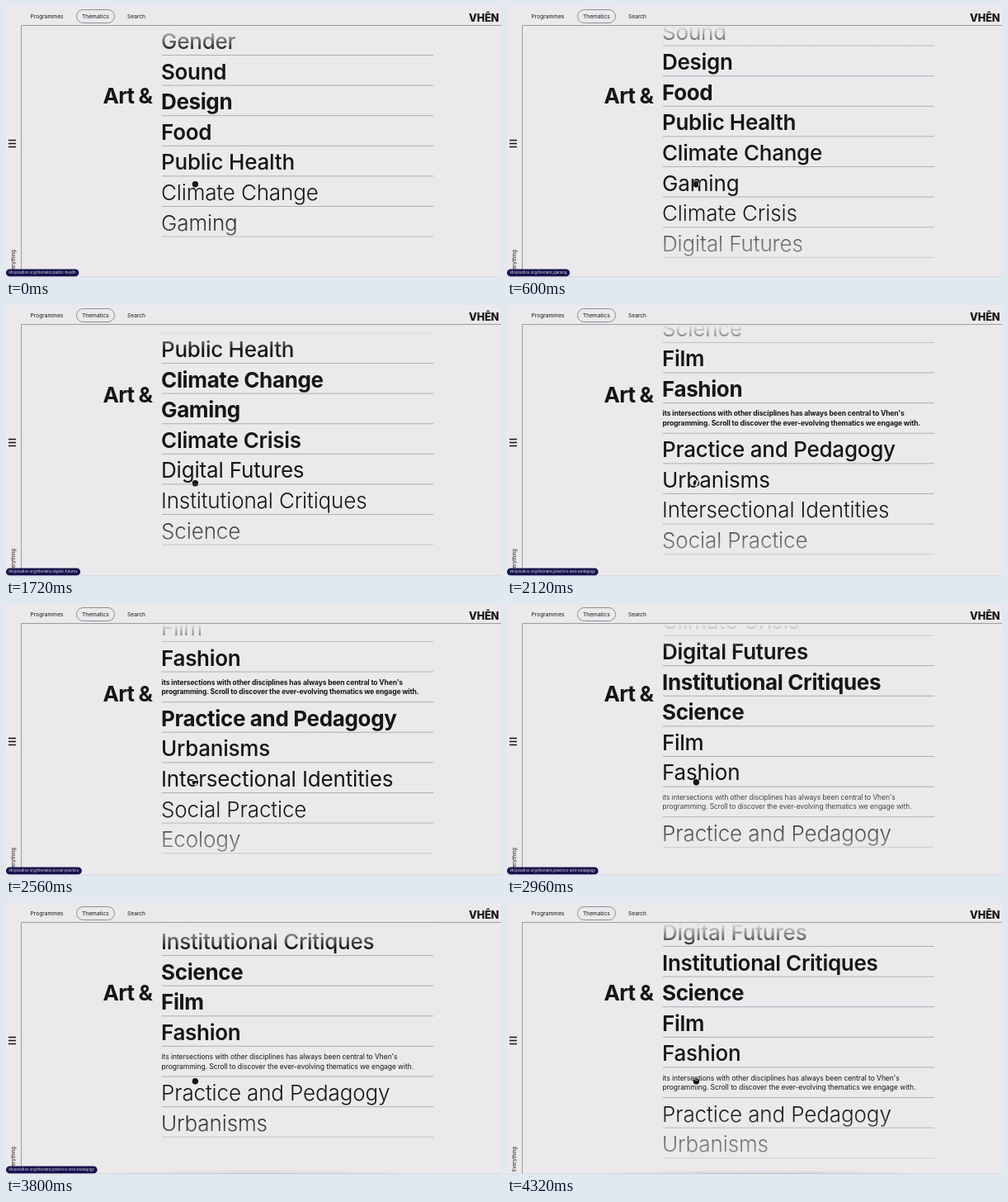
Recreate the animation shown at these times as an HTML page. Size 600x328 px, loop 4400 ms.

```html
<!DOCTYPE html>
<html lang="en">
<head>
<meta charset="utf-8">
<title>Thematics</title>
<style>
  html, body { margin: 0; width: 100%; height: 100%; overflow: hidden; background: #ebe9ec; }
  svg { display: block; width: 600px; height: 328px; font-family: Inter, "Open Sans", sans-serif; fill: #161517; }
  .nav { font-size: 6.65px; }
  .rule { stroke: #949296; stroke-width: 0.9; }
  .row line { stroke: #a9a7ab; stroke-width: 0.9; }
  .row text { letter-spacing: var(--gap); }
  .title { font-size: 26px; }
  .note { font-size: 8.5px; }
  .lead { font-size: 26px; font-weight: 700; letter-spacing: -0.032em; }
  .mark { font-size: 12.8px; font-weight: 800; letter-spacing: -0.01em; }
  .status { font-size: 4.45px; fill: #dddbea; }
  .dot { fill: #fff; mix-blend-mode: difference; }
</style>
</head>
<body>
<svg viewBox="0 0 600 328">
  <defs>
    <linearGradient id="fade" gradientUnits="userSpaceOnUse" x1="0" y1="24" x2="0" y2="328">
      <stop offset="0" stop-color="#fff" stop-opacity="0"/>
      <stop offset="0.1" stop-color="#fff"/>
      <stop offset="0.75" stop-color="#fff"/>
      <stop offset="0.82" stop-color="#fff" stop-opacity="0.76"/>
      <stop offset="0.88" stop-color="#fff" stop-opacity="0.53"/>
      <stop offset="1" stop-color="#fff" stop-opacity="0.36"/>
    </linearGradient>
    <mask id="window" maskUnits="userSpaceOnUse" x="0" y="24" width="600" height="304">
      <rect y="24" width="600" height="304" fill="url(#fade)" style="mask-type:alpha"/>
    </mask>
    <radialGradient id="shade">
      <stop offset="0" stop-color="#000" stop-opacity="0.15"/>
      <stop offset="1" stop-color="#000" stop-opacity="0"/>
    </radialGradient>
  </defs>

  <rect width="600" height="328" fill="#ebe9ec"/>
  <path class="rule" d="M18.5 328V23.5H600" fill="none"/>
  <path d="M0 327.5H600" stroke="#dbd9dd"/>

  <g class="nav">
    <text x="29.6" y="14.7">Programmes</text>
    <text x="92" y="14.7">Thematics</text>
    <text x="147" y="14.7">Search</text>
    <rect x="85.5" y="4.5" width="46" height="16" rx="8" fill="none" stroke="#77757a" stroke-width="0.8"/>
  </g>
  <text class="mark" x="597.5" y="18.5" text-anchor="end">VHĒN</text>
  <path d="M3 162.5h9M3 166.5h9M3 170.5h9" stroke="#161517" stroke-width="1.4"/>
  <text transform="translate(10.6 325) rotate(-90)" font-size="5.9">Everything</text>
  <text class="lead" x="117.6" y="118">Art &amp;</text>

  <g id="list" mask="url(#window)"></g>
  <ellipse id="shadow" cx="305" cy="329" rx="215" ry="6" fill="url(#shade)"/>
  <g id="pill">
    <rect id="pillBox" x="0" y="318.4" height="8.9" rx="4.4" fill="#15114c"/>
    <text id="pillText" class="status" x="3.4" y="324.4"></text>
  </g>
  <circle class="dot" cx="229.4" cy="215.8" r="3.7"/>
</svg>

<script>
const LOOP = 4400, STEP = 40, PITCH = 36.6, FIRST_LINE = 59.5;
const NOTE = [
  "its intersections with other disciplines has always been central to Vhen's",
  "programming. Scroll to discover the ever-evolving thematics we engage with."
];
const ITEMS = ["Gender", "Sound", "Design", "Food", "Public Health", "Climate Change", "Gaming",
  "Climate Crisis", "Digital Futures", "Institutional Critiques", "Science", "Film", "Fashion",
  NOTE, "Practice and Pedagogy", "Urbanisms", "Intersectional Identities", "Social Practice",
  "Ecology", "Gender"];

// [time, scroll offset]
const SCROLL = [[-400, -32], [0, 0], [600, 48], [960, 76.2], [1720, 135.4], [2300, 446],
  [2560, 416.6], [3020, 272], [3320, 289.8], [3740, 326], [4320, 299.8], [4600, 297]];

// [time, hovered item]; -1 hides the address
const HOVER = [[0, 4], [120, 5], [480, 6], [1000, 7], [1440, -1], [1520, 8], [1840, 9], [1960, 11],
  [2080, 14], [2240, 16], [2360, 17], [2640, 16], [2760, 15], [2880, 14], [3040, 12],
  [3480, -1], [3720, 14], [4000, -1]];

const $ = id => document.getElementById(id);
const clamp = v => Math.max(0, Math.min(1, v));

function add(parent, tag, attrs, text) {
  const el = document.createElementNS("http://www.w3.org/2000/svg", tag);
  for (const key in attrs) el.setAttribute(key, attrs[key]);
  if (text) el.textContent = text;
  return parent.appendChild(el);
}

const rows = ITEMS.map(item => {
  const g = add($("list"), "g", { class: "row" });
  add(g, "line", { x1: 189, x2: 518, y1: 0, y2: 0 });
  if (item === NOTE) {
    NOTE.forEach((line, i) => add(g, "text", { class: "note", x: 188.6, y: -21 + i * 11.6 }, line));
  } else {
    add(g, "text", { class: "title", x: 188, y: -7.6 }, item);
  }
  return g;
});

// Monotone cubic: slopes flatten at turning points
const secant = i => (SCROLL[i + 1][1] - SCROLL[i][1]) / (SCROLL[i + 1][0] - SCROLL[i][0]);
function slope(i) {
  if (i === 0) return secant(0);
  if (i === SCROLL.length - 1) return secant(i - 1);
  const a = secant(i - 1), b = secant(i);
  return a * b <= 0 ? 0 : 2 * a * b / (a + b);
}
function scrollAt(t) {
  let i = 0;
  while (SCROLL[i + 1][0] <= t) i++;
  const [t0, y0] = SCROLL[i], [t1, y1] = SCROLL[i + 1];
  const h = t1 - t0, u = (t - t0) / h, v = 1 - u;
  return y0 * (1 + 2 * u) * v * v + slope(i) * h * u * v * v
    + y1 * u * u * (3 - 2 * u) - slope(i + 1) * h * u * u * v;
}

// Titles grow bolder as they pass the lead text
function drawRows(offset) {
  rows.forEach((g, i) => {
    const y = FIRST_LINE + PITCH * i - offset;
    const shown = clamp((311.5 - y) / 2);
    g.style.display = y < 20 || !shown ? "none" : "";
    const near = Math.exp(-(((y - 16.5 - 112) / 78) ** 2));
    g.setAttribute("transform", `translate(0 ${y.toFixed(2)})`);
    g.style.opacity = shown;
    g.style.fontWeight = Math.round(310 + 390 * near);
    g.style.setProperty("--gap", `${(-0.004 - 0.0105 * near).toFixed(4)}em`);
  });
}

let lastItem;
function drawStatus(t) {
  const item = HOVER.filter(([start]) => start <= t).pop()[1];
  if (item === lastItem) return;
  lastItem = item;
  $("pill").style.display = item < 0 ? "none" : "";
  if (item < 0) return;
  const slug = ITEMS[item].toLowerCase().replace(/ /g, "-");
  $("pillText").textContent = "khojstudios.org/thematic/" + slug;
  $("pillBox").setAttribute("width", $("pillText").getComputedTextLength() + 7);
}

function draw(now) {
  const t = Math.min(4320, Math.floor((now % LOOP) / STEP) * STEP);
  drawRows(scrollAt(t));
  drawStatus(t);
  $("shadow").style.opacity = clamp((t - 3000) / 1000);
}

const begin = performance.now();
function tick() {
  draw(performance.now() - begin);
  requestAnimationFrame(tick);
}
tick();
</script>
</body>
</html>
```
